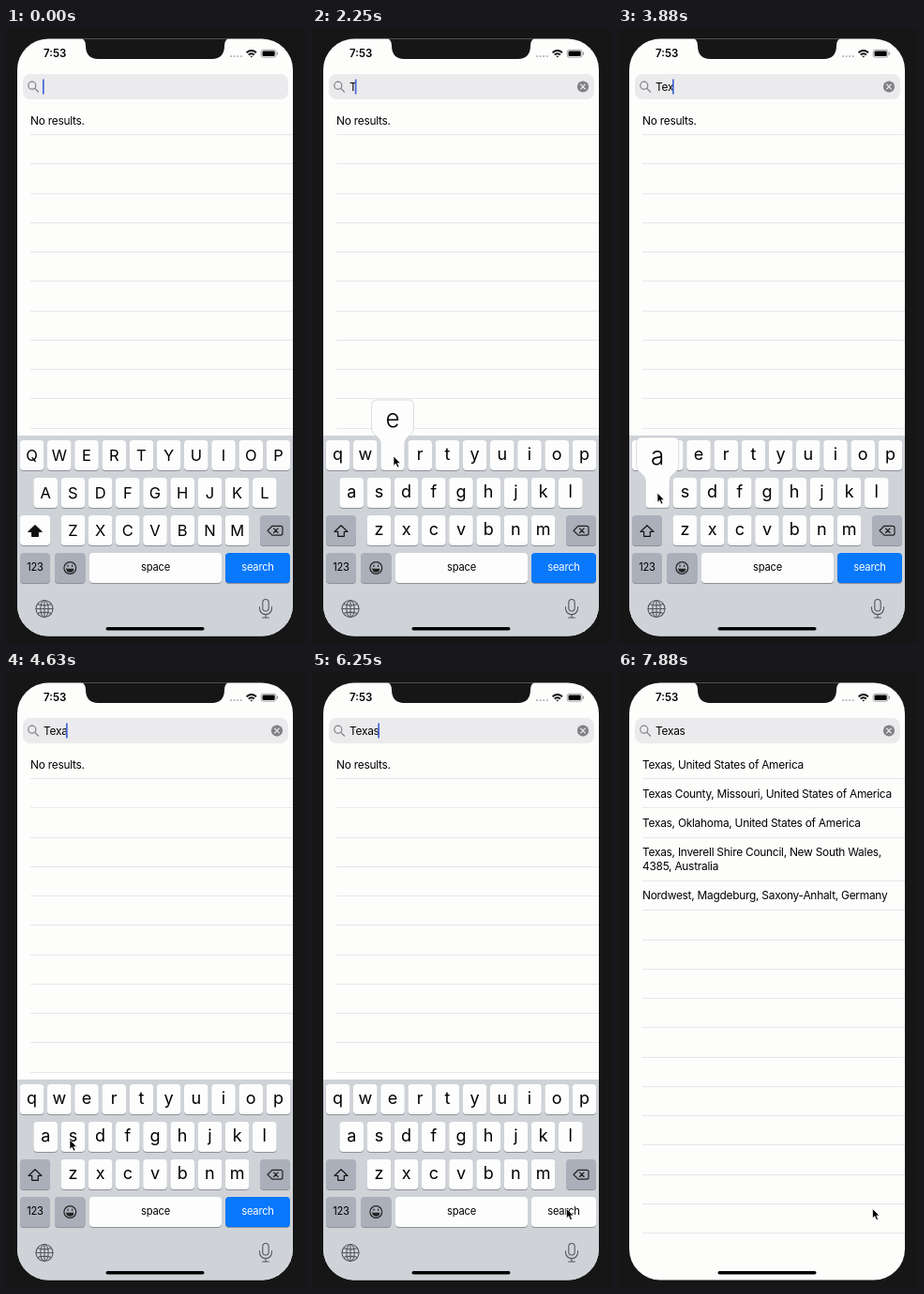
An HTML page for the animation above (8000 ms loop, 320x656 px).

```html
<!DOCTYPE html>
<html lang="en">
<head>
<meta charset="utf-8">
<title>Place search</title>
<style>
  html, body { margin: 0; width: 100%; height: 100%; overflow: hidden; background: #161617; }
  svg { display: block; width: 100vw; height: 100vh; font-family: Inter, "Open Sans", sans-serif; }
  .copy { font-size: 11.9px; letter-spacing: -.021em; }
  .mid { text-anchor: middle; }
  .upper { font-size: 16.5px; }
  .lower { font-size: 18px; }
  .small { font-size: 11.2px; letter-spacing: -.02em; }
  .line { fill: none; stroke-linecap: round; stroke-linejoin: round; }
  .key { fill: #fdfdfd; }
  .gray { fill: #aaafb9; }
  .rules { stroke: #e6e6ec; }
</style>
</head>
<body>
<svg viewBox="0 0 320 656" xmlns="http://www.w3.org/2000/svg">
  <defs>
    <clipPath id="screen"><rect x="12" y="11.5" width="294" height="636" rx="33"/></clipPath>
  </defs>
  <g clip-path="url(#screen)">
    <rect x="12" y="11" width="294" height="637" fill="#fdfdfc"/>
    <rect x="18" y="49" width="283" height="27" rx="8" fill="#ebebed"/>
    <g class="line" stroke="#808084" stroke-width="1.2">
      <circle cx="27.8" cy="61.2" r="4"/><path d="M30.8 64.3l3.7 3.7"/>
    </g>
    <text id="query" class="copy" x="40" y="66.7"></text>
    <rect id="caret" y="54.5" width="1.7" height="16" fill="#4468d8"/>
    <g id="clear">
      <circle cx="289" cy="62.5" r="6.1" fill="#828286"/>
      <path class="line" d="M286.7 60.2l4.6 4.6m0-4.6l-4.6 4.6" stroke="#f0f0f2" stroke-width="1.2"/>
    </g>

    <g id="empty" class="copy"></g>
    <g id="results" class="copy"></g>

    <g id="keyboard">
      <rect x="12" y="434" width="294" height="222" fill="#cfd3d8"/>
      <g id="keys"></g>
      <path id="shift" class="line" d="M31 529.8l7 6.6h-3.7v4.9h-6.6v-4.9H24z" stroke="#111" stroke-width="1.2"/>
      <g class="line" stroke="#222" stroke-width="1.2">
        <path d="M284 530.3h9a2 2 0 0 1 2 2v5.8a2 2 0 0 1-2 2h-9l-5-4.9zM285.5 532.9l4.6 4.6m0-4.6l-4.6 4.6"/>
        <circle cx="68.3" cy="575" r="6.4"/>
        <path d="M66 572.2v1.1m4.6-1.1v1.1"/>
        <path d="M64.5 576h7.6a3.8 3.5 0 0 1-7.6 0z" fill="#222" stroke-width=".5"/>
      </g>
      <g class="line" stroke="#54575c" stroke-width="1.1">
        <circle cx="41" cy="618.5" r="9"/><ellipse cx="41" cy="618.5" rx="4.2" ry="9"/>
        <path d="M41 609.5v18M32 618.5h18M33.6 613.5q7.4 2.8 14.8 0M33.6 623.5q7.4-2.8 14.8 0"/>
        <rect x="273.8" y="608.5" width="6.4" height="12.5" rx="3.2"/>
        <path d="M270.5 616.5v1.8a6.5 6.3 0 0 0 13 0v-1.8M277 624.6v3.4M273.6 628h6.8"/>
      </g>
      <g id="popup">
        <path d="M-17-43h34q5.5 0 5.5 5.5V-13c0 8-9.7 8-9.7 17v24q0 4-4 4h-17.6q-4 0-4-4V4c0-9-9.7-9-9.7-17v-24.5q0-5.5 5.5-5.5z" fill="#fdfdfd" stroke="#c4c7cc" stroke-width=".6"/>
        <text class="mid" y="-14.5" font-size="26" font-weight="300"></text>
      </g>
    </g>

    <rect x="106.5" y="638" width="105" height="3.6" rx="1.8"/>
    <path d="M77 10q8 1 8 9c0 9 5 14 13 14H220c8 0 13-5 13-14q0-8 8-9z" fill="#161617"/>
    <text x="40" y="31.4" font-size="11.5" font-weight="600">7:53</text>
    <path d="M239 30.2h13" stroke="#b8b8bc" stroke-width="1.8" stroke-dasharray="2 1.6"/>
    <g class="line" stroke="#111" stroke-width="1.9" style="stroke-linecap:butt">
      <path d="M256.6 26.2q5.2-4.4 10.4 0M258.7 28.6q3.1-2.6 6.2 0"/>
      <path d="M260.3 29.7h3l-1.5 1.9z" fill="#111" stroke="none"/>
    </g>
    <rect x="272.2" y="23.3" width="15.8" height="7.9" rx="2.2" fill="none" stroke="#8c8c90" stroke-width=".8"/>
    <rect x="273.5" y="24.6" width="13.2" height="5.3" rx="1.2"/>
    <path d="M289.4 25.7v3" stroke="#8c8c90"/>
  </g>
  <path id="pointer" d="M0 0V10.3L2.4 8.1 4.1 12.1 6 11.3 4.3 7.4H7.4z" stroke="#fdfdfd" stroke-width=".7"/>
</svg>
<script>
const NS = 'http://www.w3.org/2000/svg';
const LOOP = 8000, STEP = 125, PITCH = 29.2, ROW = 31.25;
const $ = id => document.getElementById(id);

function add(parent, tag, attrs, text) {
  const node = document.createElementNS(NS, tag);
  for (const name in attrs) node.setAttribute(name, attrs[name]);
  if (text) node.textContent = text;
  parent.append(node);
  return node;
}
const show = (node, on) => node.style.display = on ? '' : 'none';

// Table rows
function rules(parent, from, to) {
  for (let y = from; y < to; y += ROW) {
    add(parent, 'path', { class: 'rules', d: `M26 ${Math.round(y) + .5}H306` });
  }
}
function label(parent, y, text) {
  add(parent, 'text', { x: 26, y }, text);
}
label($('empty'), 102.5, 'No results.');
rules($('empty'), 113, 630);

[
  [102.5, 'Texas, United States of America'],
  [133.5, 'Texas County, Missouri, United States of America'],
  [165, 'Texas, Oklahoma, United States of America'],
  [195.7, 'Texas, Inverell Shire Council, New South Wales,'],
  [211.4, '4385, Australia'],
  [242.3, 'Nordwest, Magdeburg, Saxony-Anhalt, Germany']
].forEach(([y, text]) => label($('results'), y, text));
rules($('results'), 113, 180);
rules($('results'), 222, 610);

// Keyboard
function cap(x, y, width, kind) {
  const box = { x, width, height: 32, rx: 4 };
  add($('keys'), 'rect', { ...box, y: y + 1, fill: '#8e9197' });
  return add($('keys'), 'rect', { ...box, y, class: kind });
}
const letters = {};
[['QWERTYUIOP', 27.6, 439], ['ASDFGHJKL', 42.2, 479], ['ZXCVBNM', 71.4, 519]].forEach(([row, x0, y]) =>
  [...row].forEach((char, i) => {
    const x = x0 + i * PITCH;
    cap(x - 12.8, y, 25.6, 'key');
    letters[char] = { x, y, text: add($('keys'), 'text', { x }) };
  }));
const shiftCap = cap(15, 519, 32, 'key');
cap(271, 519, 32, 'gray');
cap(15, 559, 32, 'gray');
cap(52, 559, 32.5, 'gray');
cap(89, 559, 141, 'key');
const searchCap = cap(234, 559, 69, 'key');
const caption = (x, text) => add($('keys'), 'text', { x, y: 578.3, class: 'mid small' }, text);
caption(31, '123');
caption(159.5, 'space');
const searchText = caption(268.5, 'search');

// [key, pressed, released]
const presses = [
  ['T', 1500, 1750], ['E', 2250, 2500], ['X', 3125, 3375], ['A', 3875, 4125], ['S', 4750, 4875]
];
const caretStops = [39, 45.8, 51.8, 58, 64, 70.3];

// [time, x, y]
const path = [
  [625, 326, 545], [1375, 147.5, 453.5], [1750, 147.5, 453.5], [2125, 87, 456], [2500, 87, 456],
  [2875, 94.5, 532], [3375, 94.5, 532], [3750, 42, 495], [4125, 42, 495],
  [4500, 68, 498], [5125, 68, 498], [5875, 271.5, 571.5]
];
const ease = p => p * p * (3 - 2 * p);

function pointerAt(t) {
  if (t <= path[0][0]) return path[0].slice(1);
  const next = path.findIndex(stop => stop[0] > t);
  if (next < 0) return path[path.length - 1].slice(1);
  const [t0, x0, y0] = path[next - 1], [t1, x1, y1] = path[next];
  const p = ease((t - t0) / (t1 - t0));
  return [x0 + (x1 - x0) * p, y0 + (y1 - y0) * p];
}

function setLower(lower) {
  for (const char in letters) {
    const { y, text } = letters[char];
    text.textContent = lower ? char.toLowerCase() : char;
    text.setAttribute('class', 'mid ' + (lower ? 'lower' : 'upper'));
    text.setAttribute('y', y + (lower ? 21 : 22));
  }
  shiftCap.setAttribute('class', lower ? 'gray' : 'key');
  $('shift').style.fill = lower ? 'none' : '#111';
}

function caretVisible(t) {
  if (t >= 6375) return false;
  if (t < 1500) return (t + 400) % 1000 < 500;
  return t < 5375 || t >= 5875;
}

let wasLower;
function draw(t) {
  const typed = presses.filter(press => t >= press[2]).length;
  const lower = typed > 0;
  if (lower !== wasLower) setLower(wasLower = lower);

  $('query').textContent = 'Texas'.slice(0, typed);
  $('caret').setAttribute('x', caretStops[typed]);
  show($('caret'), caretVisible(t));
  show($('clear'), lower);

  const active = presses.find(press => t >= press[1] && t < press[2]);
  show($('popup'), active);
  if (active) {
    const { x, y, text } = letters[active[0]];
    $('popup').setAttribute('transform', `translate(${x} ${y})`);
    $('popup').lastElementChild.textContent = text.textContent;
  }

  const searching = t >= 6125 && t < 6375;
  searchCap.style.fill = searching ? '' : '#0878fc';
  searchText.style.fill = searching ? '#000' : '#fff';

  const slide = t < 6375 ? 0 : t < 6500 ? 95 : t < 6625 ? 199 : 222;
  $('keyboard').setAttribute('transform', `translate(0 ${slide})`);
  show($('empty'), t < 7375);
  show($('results'), t >= 7375);

  $('pointer').setAttribute('transform', `translate(${pointerAt(t)})`);
  show($('pointer'), t > path[0][0]);
}

const start = performance.now();
function frame() {
  const t = (performance.now() - start) % LOOP;
  draw(Math.floor(t / STEP) * STEP);
  requestAnimationFrame(frame);
}
frame();
</script>
</body>
</html>
```
